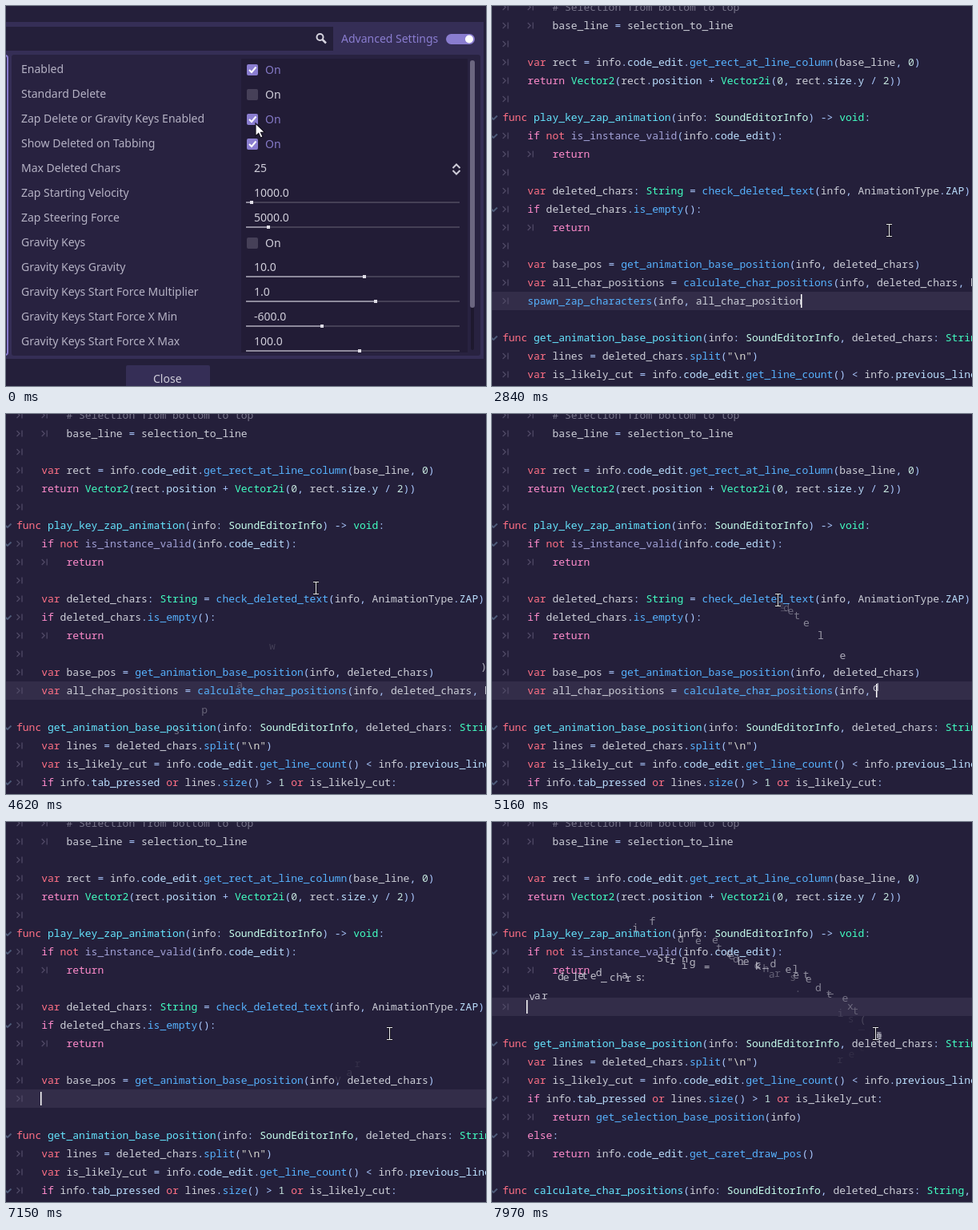
An HTML page with a canvas that plays this animation: 600 by 476 pixels, repeating every 7990 ms.

```html
<!DOCTYPE html>
<html>
<head>
<meta charset="utf-8">
<style>
  html, body { margin: 0; width: 100%; height: 100%; overflow: hidden; background: #241f3a; }
  canvas { display: block; }
</style>
</head>
<body>
<canvas id="stage" width="600" height="476"></canvas>
<script>
const ctx = document.getElementById('stage').getContext('2d');
const LOOP = 7990, ROW = 23, CHAR = 7.8, TAB = CHAR * 4, LEFT = 13;
const BASE = 4.5; // from the middle of a code row down to its baseline
const MONO = '13px "Noto Sans Mono", "DejaVu Sans Mono", monospace';
const SANS = '14px "Noto Sans", "Open Sans", sans-serif';
const BG = '#241f3a', ACCENT = '#8a7dd0';

// ---------- helpers ----------
function box(x, y, w, h, color, r = 0) {
  ctx.fillStyle = color;
  ctx.beginPath();
  ctx.roundRect(x, y, w, h, r);
  ctx.fill();
}
function line(points, color, width) {
  ctx.strokeStyle = color;
  ctx.lineWidth = width;
  ctx.beginPath();
  points.forEach(([x, y]) => ctx.lineTo(x, y));
  ctx.stroke();
}
function disc(x, y, r, color) {
  ctx.fillStyle = color;
  ctx.beginPath();
  ctx.arc(x, y, r, 0, 7);
  ctx.fill();
}
function text(s, x, y, color) {
  ctx.fillStyle = color;
  ctx.fillText(s, x, y);
}
const noise = n => { const v = Math.sin(n * 127.1 + 3.7) * 43758.5453; return v - Math.floor(v); };

// ---------- mouse ----------
const PATH = [
  [0, 312, 147], [30, 312, 147], [690, 310, 140], [1210, 310, 140], [1310, 311, 142],
  [1459, 311, 142], [1460, 222, 459], [1730, 222, 459], [2070, 207, 370], [2220, 207, 370],
  [2480, 496, 281], [2850, 496, 281], [3430, 466, 180], [3490, 461, 189], [4090, 432, 293],
  [4270, 420, 298], [4750, 380, 201], [5160, 357, 233], [5870, 372, 236], [6240, 479, 265],
  [LOOP, 479, 265]
];
function mouseAt(t) {
  const i = PATH.findIndex(p => p[0] > t);
  const [t0, x0, y0] = PATH[i - 1], [t1, x1, y1] = PATH[i];
  let u = (t - t0) / (t1 - t0);
  u = u * u * (3 - 2 * u);
  return [x0 + (x1 - x0) * u, y0 + (y1 - y0) * u];
}
function drawArrow(x, y) {
  ctx.beginPath();
  [[0, 0], [0, 16], [3.7, 12.5], [6.3, 18], [9, 16.8], [6.5, 11.4], [11.5, 11.2]]
    .forEach(([a, b]) => ctx.lineTo(x + a, y + b));
  ctx.closePath();
  ctx.fillStyle = '#fff';
  ctx.strokeStyle = '#15121f';
  ctx.lineWidth = 1.2;
  ctx.fill();
  ctx.stroke();
}
function drawBeam(x, y) {
  x = Math.round(x) + .5;
  y = Math.round(y);
  for (const [color, w] of [['#17141f', 3], ['#e8e8ee', 1]]) {
    line([[x, y - 7], [x, y + 7]], color, w);
    line([[x - 3.5, y - 7.5], [x + 3.5, y - 7.5]], color, w);
    line([[x - 3.5, y + 7.5], [x + 3.5, y + 7.5]], color, w);
  }
}

// ---------- settings dialog ----------
const ROWS = [
  ['Enabled', true], ['Standard Delete', false], ['Zap Delete or Gravity Keys Enabled', true],
  ['Show Deleted on Tabbing', true], ['Max Deleted Chars', '25'],
  ['Zap Starting Velocity', '1000.0', 307], ['Zap Steering Force', '5000.0', 328],
  ['Gravity Keys', false], ['Gravity Keys Gravity', '10.0', 448],
  ['Gravity Keys Start Force Multiplier', '1.0', 462],
  ['Gravity Keys Start Force X Min', '-600.0', 395], ['Gravity Keys Start Force X Max', '100.0', 442]
];
function drawCheck(y, on) {
  box(301, y - 6, 14, 14, on ? ACCENT : '#464058', 2);
  if (on) line([[304, y + 1], [307, y + 4], [312.5, y - 2.5]], '#fff', 2);
  text('On', 324, y + 6, on ? '#8479c6' : '#cfcdd9');
}
function drawDialog(t) {
  const selected = t >= 700, closing = t >= 1460;
  ctx.font = SANS;
  box(0, 0, 600, 476, BG);
  box(0, 20, 597, 422, '#352e56');
  box(0, 26, 409, 30, BG);
  ctx.strokeStyle = '#d6d4df';
  ctx.lineWidth = 2;
  ctx.beginPath();
  ctx.arc(392.5, 39, 4, 0, 7);
  ctx.stroke();
  line([[395.5, 42], [400, 46.5]], '#d6d4df', 2.5);
  text('Advanced Settings', 419, 46, ACCENT);
  box(550, 35, 36, 13, ACCENT, 6.5);
  disc(579, 41.5, 5, '#fff');

  box(-10, 61, 13, 377, BG, 3);
  if (!selected) {
    ctx.strokeStyle = ACCENT;
    ctx.lineWidth = 2;
    ctx.beginPath();
    ctx.roundRect(-10, 62, 12, 375, 3);
    ctx.stroke();
  }
  box(7, 61, 586, 377, '#282240', 3);
  box(294, 66, 283, 368, '#221c36');
  box(581, 68, 4, 363, '#1e192e', 2);
  box(580, 68, 6, 310, '#6b6680', 3);
  if (selected) box(11, 127, 283, 31, '#433a69');

  ROWS.forEach(([label, value, grab], i) => {
    const y = 79 + 31 * i;
    text(label, 19, y + 5, '#b5b2c4');
    if (typeof value === 'boolean') {
      drawCheck(y, value && !(i === 2 && t >= 800 && t < 960));
      return;
    }
    text(value, 310, y + 5, '#cfcdd9');
    if (grab) {
      box(300, y + 11, 267, 2, '#454056');
      box(300, y + 11, grab - 300, 2, '#8e8a9c');
      box(grab - 2, y + 10, 4, 4, '#dddbe4');
    } else {
      line([[558.5, y], [563, y - 4.5], [567.5, y]], '#cfcdd9', 2);
      line([[558.5, y + 3], [563, y + 7.5], [567.5, y + 3]], '#cfcdd9', 2);
    }
  });

  box(150, 450, 105, 40, closing ? BG : '#352e56', 2);
  if (closing) {
    ctx.strokeStyle = ACCENT;
    ctx.lineWidth = 2;
    ctx.strokeRect(151, 451, 103, 40);
  }
  text('Close', 184, 472, closing ? '#9a8ee0' : '#cfcdd9');

  const [mx, my] = mouseAt(t);
  const pressed = [[700, 800], [880, 960], [1620, 1730]].some(([a, b]) => t >= a && t < b);
  if (pressed) disc(mx - 1, my + 1, 12, 'rgba(190,178,15,.8)');
  drawArrow(mx, my);
}

// ---------- code ----------
const CODE = String.raw`
		# Selection from bottom to top
		base_line = selection_to_line
	
	var rect = info.code_edit.get_rect_at_line_column(base_line, 0)
	return Vector2(rect.position + Vector2i(0, rect.size.y / 2))
	
func play_key_zap_animation(info: SoundEditorInfo) -> void:
	if not is_instance_valid(info.code_edit):
		return
	
	var deleted_chars: String = check_deleted_text(info, AnimationType.ZAP)
	if deleted_chars.is_empty():
		return
	
	var base_pos = get_animation_base_position(info, deleted_chars)
	var all_char_positions = calculate_char_positions(info, deleted_chars, base_pos)
	spawn_zap_characters(info, all_char_positions

func get_animation_base_position(info: SoundEditorInfo, deleted_chars: String) -> Vector2:
	var lines = deleted_chars.split("\n")
	var is_likely_cut = info.code_edit.get_line_count() < info.previous_line_count
	if info.tab_pressed or lines.size() > 1 or is_likely_cut:
		return get_selection_base_position(info)
	else:
		return info.code_edit.get_caret_draw_pos()

func calculate_char_positions(info: SoundEditorInfo, deleted_chars: String, base_pos: Vector2):`
  .slice(1).split('\n').map(s => ({ tabs: s.match(/^\t*/)[0].length, text: s.trim() }));
const LAST = 16; // line where the deleting begins

const RULES = [
  [/^#.*/, '#77748a'],
  [/^"[^"]*"/, '#dcdcd4'],
  [/^(func|var|not|or)\b/, '#ff7085'],
  [/^(if|else|return)\b/, '#ff8ccc'],
  [/^(Vector2i?|String|void)\b/, '#42ffc2'],
  [/^SoundEditorInfo/, '#c7ffed'],
  [/^is_instance_valid/, '#a3a3d8'],
  [/^\w+(?=\()/, '#57b3ff'],
  [/^\d+/, '#c4e4dc'],
  [/^\w+/, '#cdcfd8'],
  [/^\s+/, '#fff'],
  [/^./, '#abc9ff']
];
function highlight(s) {
  const parts = [];
  for (let i = 0; i < s.length;) {
    const rest = s.slice(i);
    const [re, base] = RULES.find(([r]) => r.test(rest));
    const word = rest.match(re)[0];
    let color = base;
    if (s.slice(0, i) === 'func ') color = '#66e6ff';
    else if (s[i - 1] === '.' && base === '#cdcfd8') color = '#bce0ff';
    parts.push({ at: i, word, color });
    i += word.length;
  }
  return parts;
}
CODE.forEach(l => l.parts = highlight(l.text));

// ---------- deleting ----------
const rowY = i => 1.5 + ROW * i;
const cur = { line: LAST, tabs: 1, len: CODE[LAST].text.length };
const states = [{ t: 0, ...cur }], flying = [];

// Presses backspace n times; with byWord, a word and its trailing signs go at once.
function erase(t, step, n, byWord) {
  for (; n--; t += step) {
    const s = CODE[cur.line].text;
    if (cur.len > 0) {
      const from = byWord ? s.slice(0, cur.len).search(/\w+\W*$/) : cur.len - 1;
      for (let i = from; i < cur.len; i++) {
        if (s[i] !== ' ') flying.push({
          t, ch: s[i], x: LEFT + cur.tabs * TAB + i * CHAR, y: rowY(cur.line), seed: flying.length
        });
      }
      cur.len = from;
    } else if (cur.tabs > 0) {
      cur.tabs--;
    } else {
      cur.line--;
      cur.tabs = CODE[cur.line].tabs;
      cur.len = CODE[cur.line].text.length;
    }
    states.push({ t, ...cur });
  }
}
erase(2660, 0, 1);
erase(3296, 24, 46);
erase(4607, 24, 57);
erase(6520, 170, 2, true);
erase(7230, 28, 27, true);

// Letters start away from the pointer's height and bend towards it, or rush straight back to it.
function drawFlying(t, mx, my) {
  for (const f of flying) {
    const age = t - f.t;
    if (age < 0 || age > 600) continue;
    const dx = mx - 2 - f.x, dy = my + 4 - f.y;
    const straight = dx < -35;
    const life = straight ? 300 : 20 + 1.1 * Math.hypot(dx, dy);
    const u = age / life;
    if (u >= 1) continue;
    let x, y;
    if (straight) {
      const k = 1 - Math.exp(-age / 50);
      x = f.x + dx * k;
      y = f.y + dy * k;
    } else {
      const bend = 2 * u * (1 - u);
      const reach = life * (.5 + .1 * noise(f.seed)) * (dy > 0 ? -1 : 1);
      x = f.x + bend * (dx * .06 + 30 * (noise(f.seed + 500) - .5)) + dx * u * u;
      y = f.y + bend * reach + dy * u * u;
    }
    ctx.globalAlpha = .9 * (straight ? Math.pow(1 - u, 1.5) : 1 - u * u);
    text(f.ch, x, y + BASE, '#d3d3dc');
  }
  ctx.globalAlpha = 1;
}

function drawRow(y, { tabs, text: s, parts }, len) {
  const x = LEFT + tabs * TAB;
  for (let i = 0; i < tabs; i++) {
    const a = LEFT + i * TAB;
    line([[a + .5, y - 3.5], [a + 4, y], [a + .5, y + 3.5]], '#504a66', 1.3);
    line([[a + 7, y - 4], [a + 7, y + 4]], '#504a66', 1.3);
  }
  if (/^(func|if|else)\b/.test(s) && len > 0) line([[-1, y], [2, y + 2.5], [6.5, y - 2]], '#4d5a78', 2);
  for (const p of parts) {
    if (p.at < len) text(p.word.slice(0, len - p.at), x + p.at * CHAR, y + BASE, p.color);
  }
}
function drawEditor(t) {
  const now = states.findLast(s => s.t <= t);
  const y = rowY(now.line);
  ctx.font = MONO;
  box(0, 0, 600, 476, BG);
  box(0, y - 11.5, 600, ROW, '#332d49');
  CODE.forEach((l, i) => {
    if (i < now.line) drawRow(rowY(i), l, l.text.length);
    else if (i === now.line) drawRow(y, { ...l, tabs: now.tabs }, now.len);
    else if (i > LAST) drawRow(rowY(i - LAST + now.line), l, l.text.length);
  });
  box(Math.round(LEFT + now.tabs * TAB + now.len * CHAR) - 1, y - 8.5, 1.5, 17, '#fff');
  const [mx, my] = mouseAt(t);
  drawFlying(t, mx, my);
  drawBeam(mx, my);
}

const start = performance.now();
function frame() {
  const t = (performance.now() - start) % LOOP;
  if (t < 1730) drawDialog(t);
  else drawEditor(t);
  requestAnimationFrame(frame);
}
frame();
</script>
</body>
</html>
```
